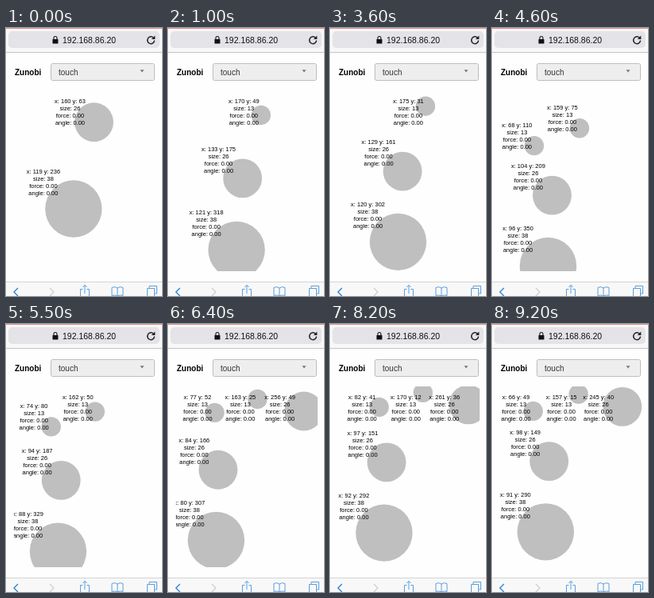
An HTML page that plays this animation: 196 by 335 pixels, repeating every 9.3 s.

```html
<!DOCTYPE html>
<html lang="en">
<head>
<meta charset="utf-8">
<title>Touch viewer</title>
<style>
  html, body { margin: 0; width: 100%; height: 100%; overflow: hidden; background: #fefefe; }
  svg { display: block; width: 100%; height: 100%; font-family: "Liberation Sans", Arial, sans-serif; }
  .label { font-size: 7.5px; text-anchor: middle; }
  .icon { fill: none; stroke: #5a9fde; }
</style>
</head>
<body>
<svg viewBox="0 0 196 335">
  <clipPath id="pad"><rect x="10" y="78" width="178" height="226"/></clipPath>

  <rect width="196" height="30" fill="#f8f8f8"/>
  <rect width="196" height=".8" fill="#e87070"/>
  <rect x="3" y="4" width="190" height="21" rx="5" fill="#e4e4e8"/>
  <path d="M0 30.500H196" stroke="#c4c4c4"/>
  <rect x="58.5" y="14" width="7" height="5.5" rx=".6" fill="#111"/>
  <path d="M60 14.5V12.5a2 2 0 0 1 4 0V14.5" fill="none" stroke="#111" stroke-width="1.1"/>
  <text x="71" y="18.8" font-size="10.5" fill="#111">192.168.86.20</text>
  <path d="M185.400 12.300A4.400 4.400 0 1 0 186.500 15.500" fill="none" stroke="#222" stroke-width="1.5"/>
  <path d="M187.300 9.500V14H182.800z" fill="#222"/>

  <text x="11" y="58.5" font-size="10" font-weight="bold">Zunobi</text>
  <rect x="56.5" y="44.5" width="130" height="21" rx="2" fill="#eee" stroke="#b0b0b0" stroke-width=".8"/>
  <text x="66" y="58.5" font-size="10" fill="#333">touch</text>
  <path d="M168.5 52.300h5l-2.500 3.200z" fill="#777"/>

  <g id="touches" clip-path="url(#pad)"></g>

  <rect y="317" width="196" height="18" fill="#f8f8f8"/>
  <path d="M0 317.5H196" stroke="#c4c4c4" stroke-width=".7"/>
  <g class="icon">
    <path d="M15 325l-5 5 5 5" stroke="#2f83d6" stroke-width="1.4"/>
    <path d="M55 325l5 5-5 5" stroke="#d0d0d0" stroke-width="1.4"/>
    <path d="M96.5 326.5H93.5V336H104.5V326.5H101.5M99 332V321.5M96.3 324l2.7-2.7 2.7 2.7"/>
    <path d="M140 325q-3.5-2.5-7-.5v10q3.5-1.5 7 .5q3.5-2 7-.5v-10q-3.5-2-7 .5v10"/>
    <path d="M180 325.5V322.5H189.5V332H186.5M177.5 325.5H186.5V336H177.5z"/>
  </g>
</svg>
<script>
const LOOP = 9300, STEP = 100, SCALE = 0.626;

// Thumb path as [seconds, x, y]; the other fingers follow it
const hand = [
  [0, 119, 236], [1, 121, 318], [2.6, 136, 307], [3.2, 126, 290], [4.6, 96, 350],
  [6.4, 80, 307], [7.2, 95, 370], [8, 92, 292], [9.2, 91, 290]
];

// rest: offset from the thumb, spread: extra offset when fanned out,
// reach: extra offset that fades after landing
const fingers = [
  { size: 38, start: 0, rest: [0, 0], spread: [0, 0] },
  { size: 26, start: 0, rest: [10, -141], spread: [-6, 0], reach: [31, -32] },
  { size: 13, start: 0.5, rest: [49, -269], spread: [36, -14] },
  { size: 13, start: 3.9, rest: [-47, -228], spread: [47, -29] },
  { size: 26, start: 5.6, rest: [134, -242], spread: [44, -17] }
];

function add(parent, name, attrs) {
  const node = document.createElementNS("http://www.w3.org/2000/svg", name);
  set(node, attrs);
  return parent.appendChild(node);
}

function set(node, attrs) {
  for (const key in attrs) node.setAttribute(key, attrs[key]);
}

const layer = document.getElementById("touches");
for (const finger of fingers) {
  finger.radius = finger.size * SCALE * 1.5;
  finger.group = add(layer, "g", {});
  finger.circle = add(finger.group, "circle", { r: finger.radius, fill: "#bfbfbf" });
  finger.lines = [0, 1, 2, 3].map(() => add(finger.group, "text", { class: "label" }));
}

function handAt(t) {
  const next = Math.max(1, hand.findIndex(point => point[0] >= t));
  const [t0, x0, y0] = hand[next - 1], [t1, x1, y1] = hand[next];
  const p = (t - t0) / (t1 - t0), eased = p * p * (3 - 2 * p);
  return [x0 + (x1 - x0) * eased, y0 + (y1 - y0) * eased];
}

function draw({ size, start, rest, spread, reach = [0, 0], radius, group, circle, lines }, t) {
  set(group, { display: t >= start ? "inline" : "none" });
  const fan = Math.exp(-(((t - 7) / 2.5) ** 2));
  const landing = Math.exp(-3 * (t - start));
  const [x, y] = handAt(t).map((v, k) =>
    Math.round(v + rest[k] + spread[k] * fan + reach[k] * landing));

  const cx = 10.4 + x * SCALE, cy = 78.3 + y * SCALE;
  set(circle, { cx, cy });

  const labelX = Math.max(27, cx - radius * 0.7 - 13);
  const labelY = Math.max(91.7, cy - radius * 0.9 - 14.5) + 2.5;
  const label = [`x: ${x} y: ${y}`, `size: ${size}`, "force: 0.00", "angle: 0.00"];
  lines.forEach((line, i) => {
    set(line, { x: labelX, y: labelY + i * 9 });
    line.textContent = label[i];
  });
}

const begin = performance.now();
function frame() {
  const elapsed = (performance.now() - begin) % LOOP;
  const t = Math.floor(elapsed / STEP) * STEP / 1000;
  fingers.forEach(finger => draw(finger, t));
  requestAnimationFrame(frame);
}
frame();
</script>
</body>
</html>
```
